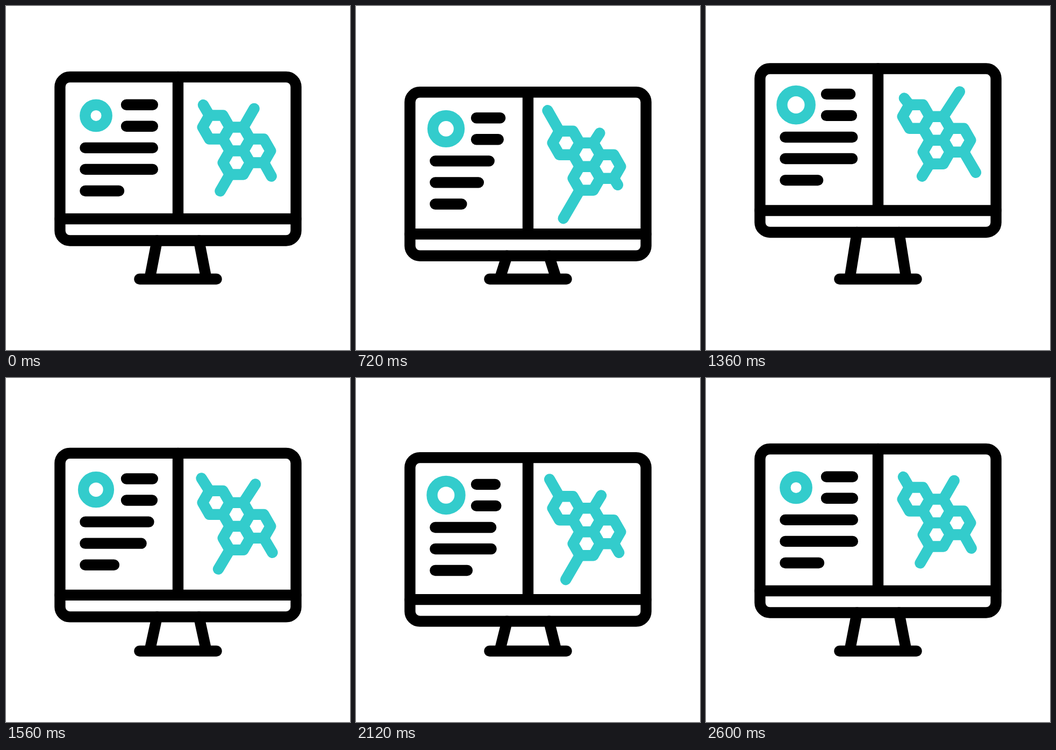
Animation of 640 by 640 pixels, one loop 3 s. Source, as an HTML page:

```html
<!DOCTYPE html>
<html lang="en">
<head>
<meta charset="utf-8">
<title>Research monitor</title>
<style>
  html, body { margin: 0; width: 100%; height: 100%; overflow: hidden; background: #fff; }
  svg { display: block; width: 100%; height: 100%; }
  g { fill: none; stroke: #000; stroke-width: 20.4; stroke-linecap: round; stroke-linejoin: round; }
  .teal { stroke: #33cccc; }
</style>
</head>
<body>
<svg viewBox="0 0 640 640">
  <g>
    <path id="stand"/>
    <g id="screen">
      <rect x="100.4" y="132" width="439.2" height="304.5" rx="18.4"/>
      <path d="M100.4 396H539.6M320 132V396"/>
    </g>
    <g id="text">
      <path id="bars"/>
      <circle id="ring" class="teal" cx="167.5" cy="203.9"/>
    </g>
    <g id="molecule" class="teal">
      <path id="cells"/>
      <path id="arms"/>
    </g>
  </g>
</svg>
<script>
const LOOP = 3000, STEP = 40;
const el = id => document.getElementById(id);
const ease = u => u * u * (3 - 2 * u);

// Eased value at time t through matching lists of key times and values
function track(t, times, values) {
  if (t <= times[0]) return values[0];
  for (let i = 1; i < times.length; i++) {
    if (t < times[i]) {
      const u = (t - times[i - 1]) / (times[i] - times[i - 1]);
      return values[i - 1] + (values[i] - values[i - 1]) * ease(u);
    }
  }
  return values[values.length - 1];
}

const evenly = (start, gap, count) => Array.from({ length: count }, (_, i) => start + i * gap);

const BOB = [120, 680, 1240, 1820, 2470];
const SWING = [120, 660, 1310, 1860, 2490];
const PULSE = evenly(187, 395, 7);
const bounce = (t, times, rest, down, up) => track(t, times, [rest, down, up, down, rest]);

// Text bars: left, right, y, shrink, start time
const bars = [
  [224, 272.8, 183.8, 14.1, 520],
  [224, 272.8, 223.8, 14.4, 440],
  [147.4, 272.8, 263.9, 32.4, 360],
  [147.4, 272.8, 303.9, 48, 280],
  [147.4, 210, 344, 13.6, 200]
];

// Molecule arms: root, then tip offset at rest, screen low, screen high
const arms = [
  { root: [378.4, 203.5], x: [-11.4, -22.2, -9.2], y: [-19.5, -39, -11.5] },
  { root: [441.6, 225.5], x: [20, 11.3, 30.7], y: [-34.6, -17.5, -47] },
  { root: [479.6, 291.5], x: [14.1, 7, 22.7], y: [25.3, 11.5, 38.7] },
  { root: [416.4, 313.5], x: [-17.9, -31, -14], y: [30.8, 53.3, 22.3] }
];

const hexagon = (cx, cy) =>
  `M${cx - 25.3} ${cy}l12.65 -22h25.3l12.65 22l-12.65 22h-25.3z`;
el("cells").setAttribute("d",
  hexagon(391, 225.5) + hexagon(429, 247.5) + hexagon(467, 269.5) + hexagon(429, 291.5));

const shift = (id, y) => el(id).setAttribute("transform", `translate(0 ${y})`);

function draw(t) {
  const dy = bounce(t, BOB, 0, 29, -21);
  shift("screen", dy);
  shift("text", bounce(t, BOB, 0, 25.2, -25.5));
  shift("molecule", bounce(t, BOB, 0, 30, -26));

  const neck = 436.5 + dy;
  el("stand").setAttribute("d",
    `M248.4 508H391.6M267.2 508L281 ${neck}M372.8 508L359 ${neck}`);

  el("bars").setAttribute("d", bars.map(([left, right, y, shrink, start]) => {
    const end = track(t, evenly(start, 520, 5), [0, 1, 0, 1, 0]);
    return `M${left} ${y}H${right - shrink * end}`;
  }).join(""));

  el("ring").setAttribute("r", track(t, PULSE, [20.2, 26.2, 20.2, 26.2, 20.2, 26.2, 20.2]));

  el("arms").setAttribute("d", arms.map(({ root, x, y }) =>
    `M${root}l${bounce(t, SWING, ...x)} ${bounce(t, SWING, ...y)}`).join(""));
}

function tick() {
  const t = performance.now() % LOOP;
  draw(Math.floor(t / STEP) * STEP);
  requestAnimationFrame(tick);
}
tick();
</script>
</body>
</html>
```
